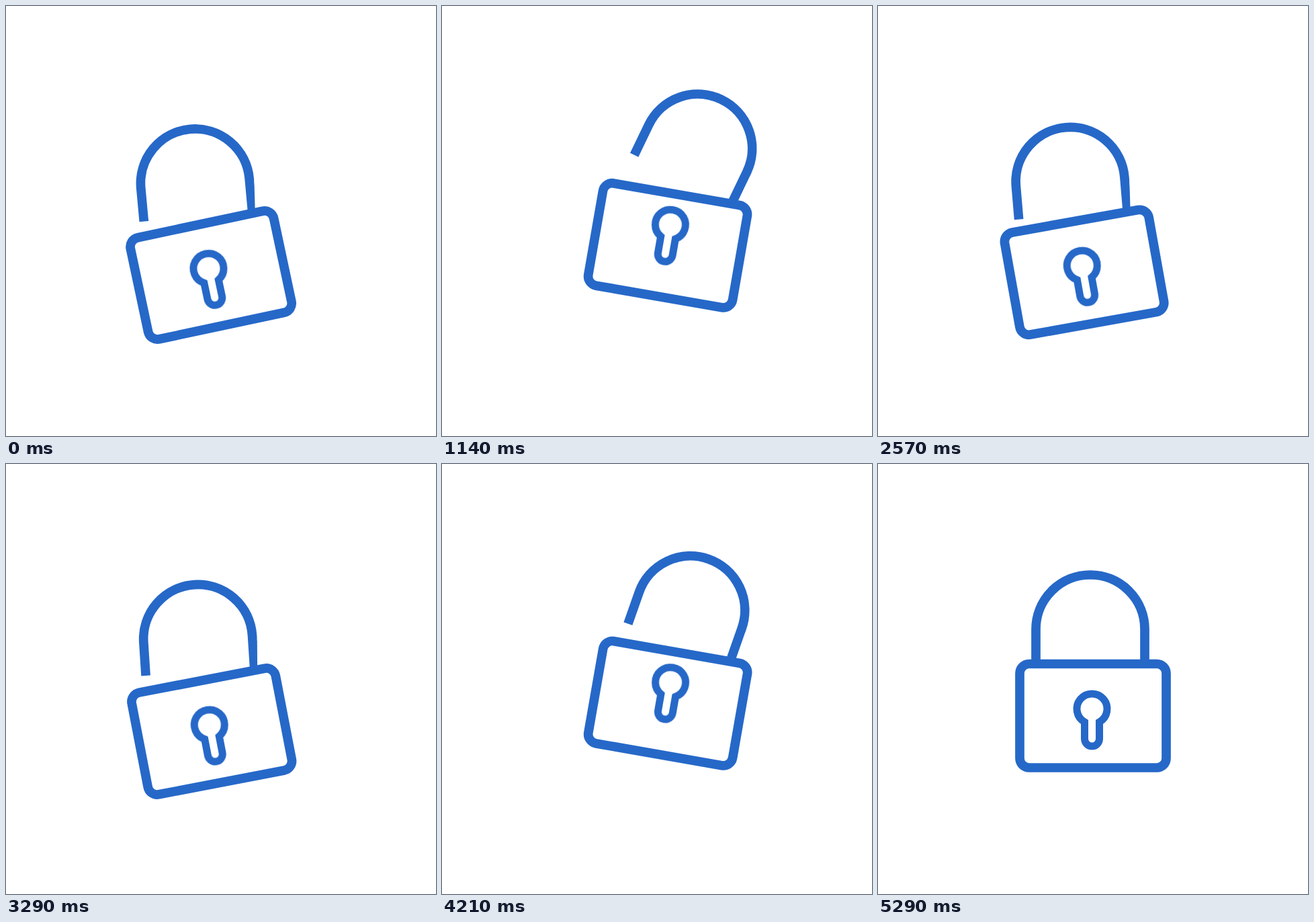
Animation, 640 px wide and 640 px high, one loop 6.07 s. Source, as an HTML page:

```html
<!DOCTYPE html>
<html lang="en">
<head>
<meta charset="utf-8">
<title>Padlock</title>
<style>
  @property --tilt { syntax: "<angle>"; inherits: true; initial-value: 0deg; }
  @property --open { syntax: "<angle>"; inherits: true; initial-value: 0deg; }

  html, body { margin: 0; width: 100%; height: 100%; overflow: hidden; background: #fff; }

  svg { display: block; width: 100%; height: 100%; }

  svg, .keyhole {
    animation: 6070ms cubic-bezier(.333, 0, .667, 1) infinite;
  }
  svg { animation-name: tilt, open; }
  .keyhole { animation-name: lift; }

  .line { fill: none; stroke: #2668c8; stroke-width: 13.7; }
  .thin { stroke-width: 11; }
  .white { fill: #fff; }

  /* The lock swings on its lower right corner, the shackle on its right leg. */
  .lock { transform-origin: 435px 458.5px; transform: rotate(var(--tilt)); }
  .shackle { transform-origin: 403px 319.5px; transform: rotate(var(--open)); }

  /* Trims the right leg while the lock leans left. */
  .trim { transform-origin: 404px 250px; transform: rotate(max(0deg, var(--tilt) * -.3)); }

  @keyframes tilt {
    0%      { --tilt: -12deg; animation-timing-function: cubic-bezier(.25, 0, .5, 1); }
    17.463% { --tilt: 10deg; animation-timing-function: cubic-bezier(.28, 0, .37, 1); }
    52.554% { --tilt: -12deg; animation-timing-function: cubic-bezier(.25, 0, .5, 1); }
    68.863% { --tilt: 10deg; }
    79.572% { --tilt: -1.8deg; }
    84.349%, 100% { --tilt: 0deg; }
  }

  @keyframes open {
    0%      { --open: 6.75deg; }
    10.544% { --open: 16deg; }
    17.298% { --open: 16.2deg; animation-timing-function: cubic-bezier(.33, 0, .75, 1); }
    32.949% { --open: -1.6deg; }
    46.129%, 52.883% { --open: 7deg; }
    62.438% { --open: 10.2deg; animation-timing-function: cubic-bezier(.4, 0, .7, .6); }
    74.135% { --open: 8.4deg; animation-timing-function: cubic-bezier(.4, .12, .6, 1); }
    84.514% { --open: -2deg; }
    87.07%, 100% { --open: 0deg; }
  }

  @keyframes lift {
    0%, 2.5% { transform: translateY(0); }
    17.6%    { transform: translateY(-21px); }
    34.3%, 54.8% { transform: translateY(0); }
    69.3%    { transform: translateY(-21px); }
    86.5%, 100% { transform: translateY(0); }
  }
</style>
</head>
<body>
<svg viewBox="0 0 640 640">
  <g class="lock">
    <g class="shackle">
      <path class="line" d="M235 295.5V246a81 81 0 0 1 162 0V296"/>
      <path class="white trim" d="M404 250V299H412V250Z"/>
    </g>
    <rect class="line" x="211" y="297.5" width="218" height="154.5" rx="14"/>
    <path class="line thin keyhole" d="M307.5 384.1V409a11 11 0 0 0 22 0V384.1A22.5 22.5 0 1 0 307.5 384.1Z"/>
  </g>
</svg>
</body>
</html>
```
